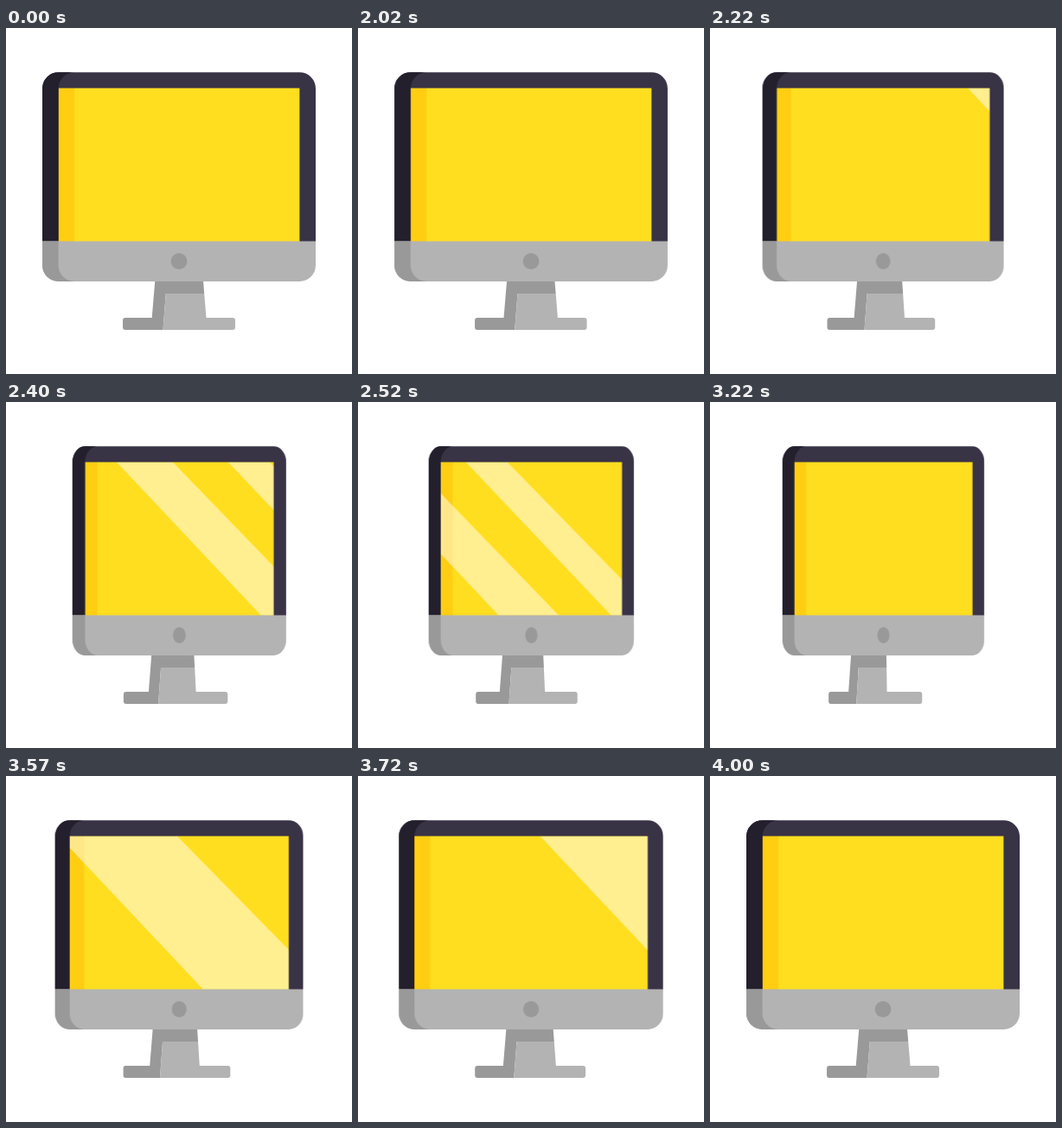
Write an HTML page that moves like this. It is 400 px wide and 400 px high and loops after 4020 ms.

```html
<!DOCTYPE html>
<html lang="en">
<head>
<meta charset="utf-8">
<title>Turning monitor</title>
<style>
  html, body { margin: 0; width: 100%; height: 100%; overflow: hidden; background: #fff; }
  svg { display: block; width: 100%; height: 100%; }

  .turn, .stand, .shine { animation: 4020ms linear infinite; }

  /* Turn away from 2 s to 3 s, then back until 4 s */
  .turn { transform-origin: 200px 200px; animation-name: turn; }
  @keyframes turn {
    0% { transform: none; }
    49.75% { transform: none; animation-timing-function: cubic-bezier(.29, 0, .05, 1); }
    74.63% { transform: translateX(.5px) scaleX(.715); animation-timing-function: cubic-bezier(.5, 0, .45, 1); }
    99.5%, 100% { transform: none; }
  }

  .dark { animation-name: stand-dark; }
  @keyframes stand-dark {
    0%, 49.75%, 99.5%, 100% {
      d: path("M172.3 292 H228 L229.2 307 H184.8 L181.5 349 H138 Q135 349 135 346 V338 Q135 335 138 335 H168.7 Z");
    }
    49.75% { animation-timing-function: cubic-bezier(.29, 0, .05, 1); }
    74.63% {
      d: path("M162.2 292 H201.5 L201.7 307 H170.5 L168 349 H139.8 Q137.3 349 137.3 346 V338 Q137.3 335 139.8 335 H159.3 Z");
      animation-timing-function: cubic-bezier(.5, 0, .37, 1);
    }
  }

  .light { animation-name: stand-light; }
  @keyframes stand-light {
    0%, 49.75%, 99.5%, 100% {
      d: path("M184.8 307 H229.2 L231.5 335 H262 Q265 335 265 338 V346 Q265 349 262 349 H181.5 Z");
    }
    49.75% { animation-timing-function: cubic-bezier(.29, 0, .05, 1); }
    74.63% {
      d: path("M170.5 307 H201.7 L201.9 335 H240.8 Q243.3 335 243.3 338 V346 Q243.3 349 240.8 349 H168 Z");
      animation-timing-function: cubic-bezier(.5, 0, .37, 1);
    }
  }

  /* Reflections sweep left, then right */
  .shine { fill: #fff; opacity: .5; }
  .pair { animation-name: sweep-left; }
  @keyframes sweep-left {
    0%, 49.75% { transform: translateX(395px); animation-timing-function: cubic-bezier(.33, 0, .67, 1); }
    74.63%, 100% { transform: translateX(-351px); }
  }
  .wide { animation-name: sweep-right; }
  @keyframes sweep-right {
    0%, 74.63% { transform: translateX(-442px); animation-timing-function: cubic-bezier(.33, 0, .67, 1); }
    99.5%, 100% { transform: translateX(293px); }
  }
</style>
</head>
<body>
<svg viewBox="0 0 400 400">
  <path class="stand dark" fill="#999" d="M172.3 292 H228 L229.2 307 H184.8 L181.5 349 H138 Q135 349 135 346 V338 Q135 335 138 335 H168.7 Z"/>
  <path class="stand light" fill="#b3b3b3" d="M184.8 307 H229.2 L231.5 335 H262 Q265 335 265 338 V346 Q265 349 262 349 H181.5 Z"/>

  <g class="turn">
    <rect x="60" y="69" width="280" height="178" fill="#ffde20"/>
    <rect x="60" y="69" width="19.2" height="178" fill="#ffce12"/>
  </g>

  <!-- The frame drawn above hides the ends of the reflections -->
  <g class="shine pair">
    <path d="M126 69.6 H174 L347 246.8 H294 Z"/>
    <path d="M-3 69.6 H62 L233.5 246.8 H164 Z"/>
  </g>
  <path class="shine wide" d="M58 69.6 H195 L369 246.8 H225 Z"/>

  <g class="turn">
    <path fill="#393346" d="M60.6 51.2 H339.4 A18.6 18.6 0 0 1 358 69.8 V247 H339.4 V69.6 H60.6 V247 H42 V69.8 A18.6 18.6 0 0 1 60.6 51.2 Z"/>
    <path fill="#231f2c" d="M60.6 51.2 H79.2 A18.6 18.6 0 0 0 60.6 69.8 V247 H42 V69.8 A18.6 18.6 0 0 1 60.6 51.2 Z"/>
    <path fill="#b3b3b3" d="M42 246.4 H358 V274.4 A18.6 18.6 0 0 1 339.4 293 H60.6 A18.6 18.6 0 0 1 42 274.4 Z"/>
    <path fill="#999" d="M42 246.4 H60.6 V274.4 A18.6 18.6 0 0 0 79.2 293 H60.6 A18.6 18.6 0 0 1 42 274.4 Z"/>
    <circle cx="200" cy="269.7" r="9.4" fill="#999"/>
  </g>
</svg>
</body>
</html>
```
